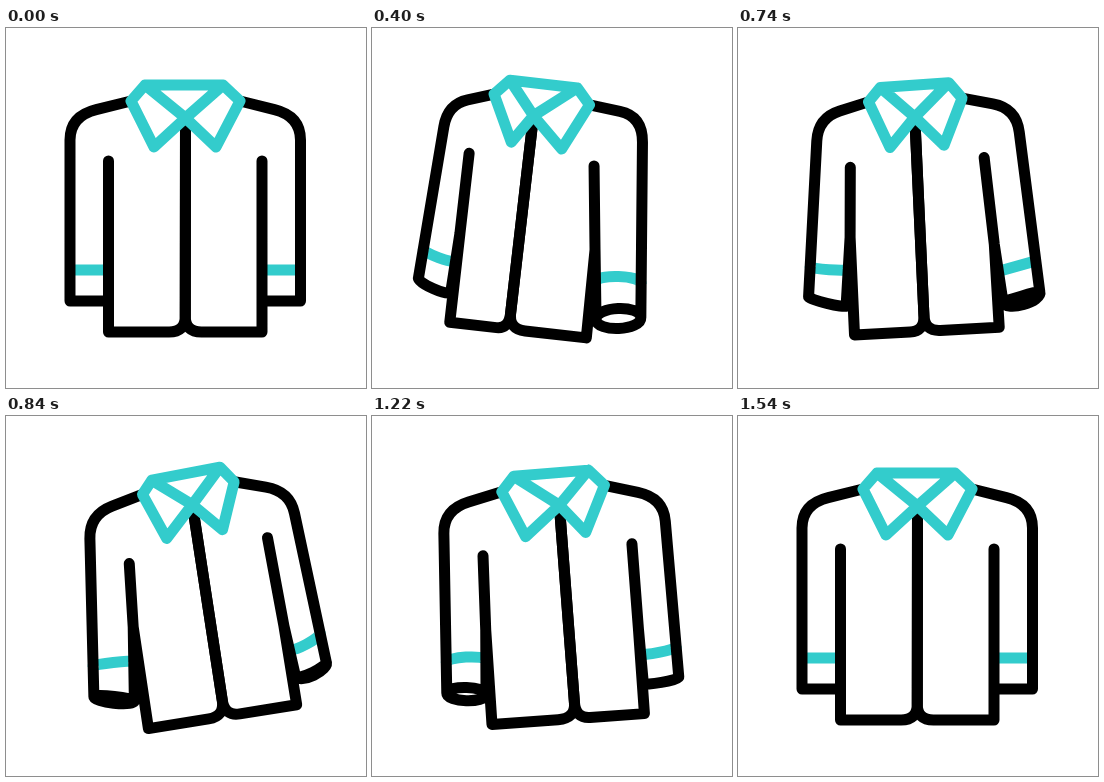
Animation, 360 px wide and 360 px high, one loop 2400 ms. Source, as an HTML page with a canvas:

```html
<!DOCTYPE html>
<html lang="en">
<head>
<meta charset="utf-8">
<title>Swinging jacket</title>
<style>
  html, body { margin: 0; width: 100%; height: 100%; overflow: hidden; background: #fff; }
  canvas { display: block; width: 360px; height: 360px; }
</style>
</head>
<body>
<canvas id="stage" width="360" height="360"></canvas>
<script>
const ctx = document.getElementById('stage').getContext('2d');
const LOOP = 2400, BLACK = '#000', TEAL = '#33cccc';
const PIVOT = [180, 0];
const TILT = [0, 6.5, -12.8].map(deg => deg * Math.PI / 180);

// Each joint: x, y at rest, swung left, swung right
const JOINTS = {
  collarL: [125, 73, 122, 66, 140, 81],
  collarR: [234, 73, 217, 77, 231, 63],
  topL: [139, 57, 138, 52, 148, 67],
  topR: [217, 57, 205, 60, 216, 49],
  tipL: [148, 119, 139, 114, 166, 124],
  tipR: [210, 119, 189, 121, 223, 111],
  shoulderL: [64, 88, 76, 76, 85, 105],
  shoulderR: [294.5, 88, 270, 88, 288, 72],
  outerL: [64, 273, 46, 249, 99, 288],
  outerR: [294.5, 273, 268, 290, 330, 234],
  innerL: [102.5, 273, 78, 264, 141, 289],
  innerR: [256, 273, 223, 292, 303, 250],
  armpitL: [102.5, 133, 97, 125, 130, 152],
  armpitR: [256, 133, 221, 138, 271, 116],
  elbowL: [102.5, 215, 87.5, 205, 136, 212],
  elbowR: [256, 215, 222, 222, 291, 205],
  hemL: [102.5, 304, 77, 294, 158, 315],
  hemR: [256, 304, 213, 310, 308, 281]
};

const rotate = ([x, y], a) => {
  const dx = x - PIVOT[0], dy = y - PIVOT[1], c = Math.cos(a), s = Math.sin(a);
  return [PIVOT[0] + dx * c - dy * s, PIVOT[1] + dx * s + dy * c];
};
const lerp = (a, b, k) => [a[0] + (b[0] - a[0]) * k, a[1] + (b[1] - a[1]) * k];

// Store the poses upright, so that blending keeps the swing on an arc
const upright = Object.entries(JOINTS).map(([name, v]) =>
  [name, TILT.map((a, i) => rotate([v[2 * i], v[2 * i + 1]], -a))]);

// Eased value of a list of [time, value] keys
function track(t, keys) {
  if (t <= keys[0][0]) return keys[0][1];
  for (let i = 1; i < keys.length; i++) {
    const [t0, v0] = keys[i - 1], [t1, v1] = keys[i];
    if (t < t1) {
      const p = (t - t0) / (t1 - t0);
      return v0 + (v1 - v0) * p * p * (3 - 2 * p);
    }
  }
  return keys[keys.length - 1][1];
}

function stroke(color, cap, trace) {
  ctx.strokeStyle = color;
  ctx.lineCap = cap;
  ctx.beginPath();
  trace();
  ctx.stroke();
}
const line = (...pts) => pts.forEach((p, i) => i ? ctx.lineTo(...p) : ctx.moveTo(...p));

// Curve from a to b whose middle sags by the given depth
function arc(a, b, depth) {
  const dx = b[0] - a[0], dy = b[1] - a[1], k = depth * 4 / 3 / Math.hypot(dx, dy);
  const nx = -dy * k, ny = dx * k;
  ctx.moveTo(...a);
  ctx.bezierCurveTo(a[0] + nx, a[1] + ny, b[0] + nx, b[1] + ny, ...b);
}

function sleeve(j, side, open, sag) {
  const [collar, shoulder, outer, inner, armpit, elbow, hem] =
    ['collar', 'shoulder', 'outer', 'inner', 'armpit', 'elbow', 'hem'].map(n => j[n + side]);
  const across = (a, b, depth) => side === 'L' ? arc(a, b, depth) : arc(b, a, depth);

  stroke(TEAL, 'butt', () =>
    across(lerp(outer, shoulder, .1676), lerp(inner, elbow, .534), sag * .8 - open * .65));
  stroke(BLACK, 'round', () => {
    line(collar, lerp(collar, shoulder, .57));
    ctx.quadraticCurveTo(...shoulder, ...lerp(shoulder, outer, .13));
    ctx.lineTo(...outer);
    across(outer, inner, sag + open);
    across(outer, inner, sag - open);
    line(armpit, elbow, inner);
    line(elbow, hem, lerp(hem, j.hemMid, .79));
    ctx.quadraticCurveTo(...j.hemMid, ...lerp(j.hemMid, j.knot, .075));
    ctx.lineTo(...lerp(j.knot, j.hemMid, .05));
  });
}

function draw(t) {
  const left = track(t, [[0, 0], [470, 1.03], [510, 1.03], [980, 0], [1370, .07], [1540, 0]]);
  const right = track(t, [[510, 0], [980, 1.05], [1370, 0]]);
  const openL = track(t, [[760, 0], [980, 11], [1540, 0]]);
  const openR = track(t, [[0, 0], [420, 10], [480, 10], [960, 0]]);
  // The front seam turns a little later than the body swings
  const seam = track(t, [[0, .5], [450, .43], [1100, .56], [1540, .5]]);

  const weights = [1 - left - right, left, right];
  const mix = values => values.reduce((sum, v, i) => sum + v * weights[i], 0);
  const tilt = mix(TILT), j = {};
  for (const [name, poses] of upright)
    j[name] = rotate([mix(poses.map(p => p[0])), mix(poses.map(p => p[1]))], tilt);
  const [x, y] = lerp(j.collarL, j.collarR, seam);
  j.knot = [x - 17 * Math.sin(tilt), y + 17 * Math.cos(tilt)];
  j.hemMid = lerp(j.hemL, j.hemR, seam);

  ctx.fillStyle = '#fff';
  ctx.fillRect(0, 0, 360, 360);
  ctx.lineWidth = 11;
  ctx.lineJoin = 'round';
  sleeve(j, 'L', openL, 4 * left);
  sleeve(j, 'R', openR, 7 * right);
  stroke(TEAL, 'round', () => {
    line(j.knot, j.tipL, j.collarL, j.topL, j.topR, j.collarR, j.tipR, j.knot);
    line(j.topL, j.knot, j.topR);
  });
}

function frame() {
  draw(performance.now() % LOOP);
  requestAnimationFrame(frame);
}
frame();
</script>
</body>
</html>
```
